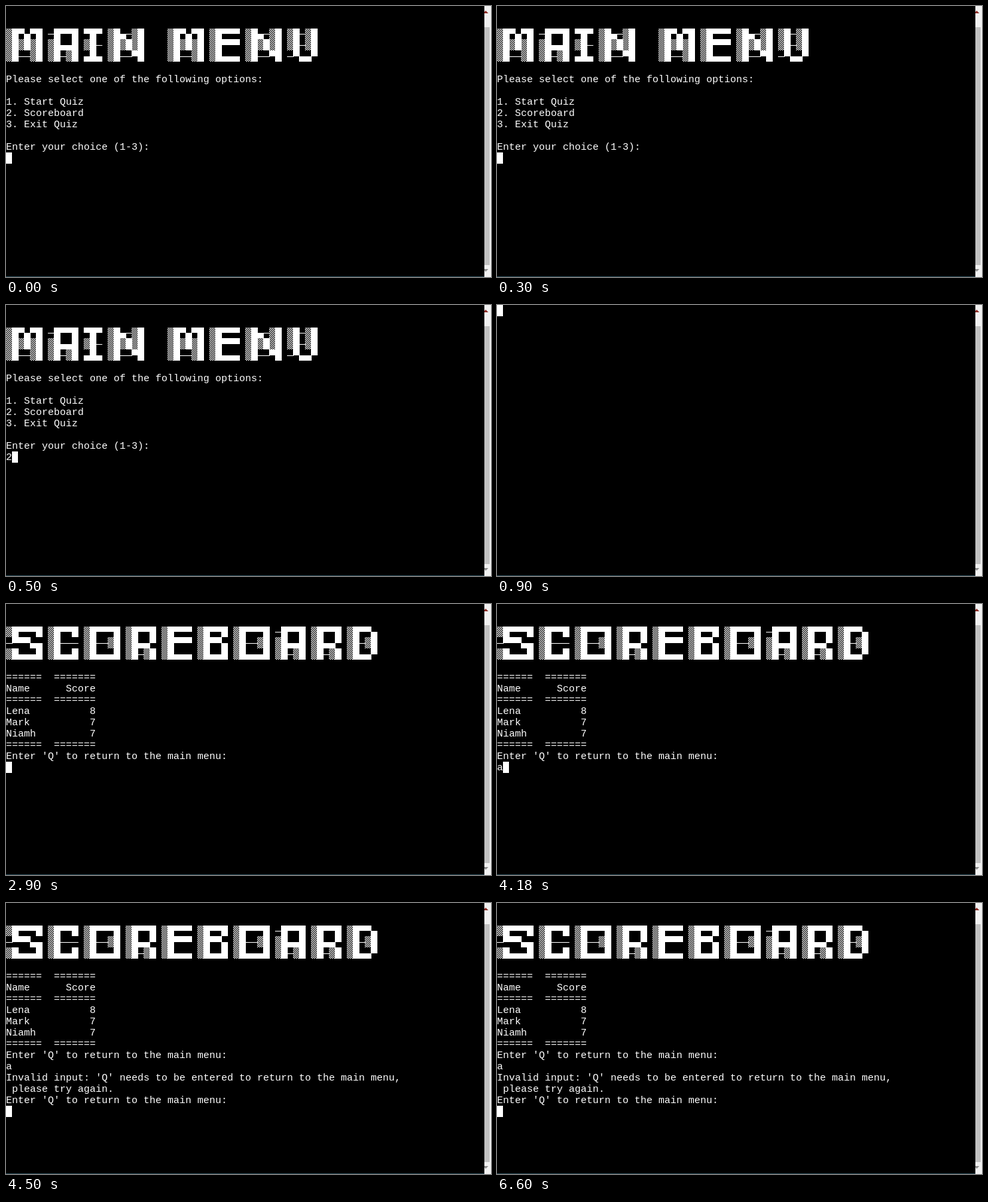
Animation, 730 px wide and 409 px high, one loop 8 s. Source, as an HTML page:

```html
<!DOCTYPE html>
<html lang="en">
<head>
<meta charset="utf-8">
<title>Quiz terminal</title>
<style>
  html, body { margin: 0; width: 100%; height: 100%; overflow: hidden; background: #000; }
  #stage { position: relative; width: 730px; height: 409px; overflow: hidden; background: #000; }
  #stage > *, .screen > * { position: absolute; left: 0; top: 0; }
  pre {
    margin: 0; color: #fff; white-space: pre;
    font: 15px/17px "Courier New", "Liberation Mono", monospace;
    font-variant-ligatures: none;
  }
  .screen > .banner { top: 34px; width: 720px; height: 50px; }
  .screen > .body { top: 103px; }
  .screen > .reply { top: 222px; }
  .board > .reply { top: 239px; }
  .board > .error { top: 256px; }

  .menu, .reply, .error, .board, #cursor { animation: 8s step-end infinite; }
  .menu { animation-name: menu; }
  .menu .reply { animation-name: choice; }
  .board { animation-name: board; }
  .board .reply { animation-name: letter; }
  .board .error { animation-name: error; }
  #cursor { width: 9px; height: 17px; background: #fff; animation-name: cursor; }

  @keyframes menu { 0% { opacity: 1 } 11.25%, 100% { opacity: 0 } }
  @keyframes choice { 0% { opacity: 0 } 6.25%, 100% { opacity: 1 } }
  @keyframes board { 0% { opacity: 0 } 12.125%, 100% { opacity: 1 } }
  @keyframes letter { 0% { opacity: 0 } 52.25%, 100% { opacity: 1 } }
  @keyframes error { 0% { opacity: 0 } 56.25%, 100% { opacity: 1 } }
  @keyframes cursor {
    0% { transform: translate(0, 221px) }
    6.25% { transform: translate(9px, 221px) }
    11.25% { transform: translate(0, 0) }
    12.125% { transform: translate(0, 238px) }
    52.25% { transform: translate(9px, 238px) }
    56.25%, 100% { transform: translate(0, 306px) }
  }
</style>
</head>
<body>
<div id="stage">
  <div class="screen menu">
    <svg class="banner" viewBox="0 1 720 50" data-text="MAIN MENU"></svg>
    <pre class="body">Please select one of the following options:

1. Start Quiz
2. Scoreboard
3. Exit Quiz

Enter your choice (1-3):</pre>
    <pre class="reply">2</pre>
  </div>
  <div class="screen board">
    <svg class="banner" viewBox="0 1 720 50" data-text="SCOREBOARD"></svg>
    <pre class="body">======  =======
Name      Score
======  =======
Lena          8
Mark          7
Niamh         7
======  =======
Enter 'Q' to return to the main menu:</pre>
    <pre class="reply">a</pre>
    <pre class="error">Invalid input: 'Q' needs to be entered to return to the main menu,
 please try again.
Enter 'Q' to return to the main menu:</pre>
  </div>
  <div id="cursor"></div>
  <svg width="730" height="409">
    <defs>
      <pattern id="shade" width="3" height="3" patternUnits="userSpaceOnUse">
        <path d="M0 0h1.5v1.5h-1.5zM1.5 1.5h1.5v1.5h-1.5z" fill="#fff"/>
      </pattern>
    </defs>
    <path d="M0 408h720v1H0z" fill="#2b4a56"/>
    <path d="M720 0h10v409h-10z" fill="#f1f1f1"/>
    <path d="M720 32h8v359h-8z" fill="#c1c1c1"/>
    <path d="M720 11v-2l2-2 4 4z" fill="#8b2a25"/>
    <path d="M720 397h6l-4 4-2-2z" fill="#8c8c8c"/>
  </svg>
</div>
<script>
const CELL = 9, ROW = 17, HALF = 9;

const glyphs = {
  A: ["─█▀▀█", "▒█▄▄█", "▒█─▒█"],
  B: ["▒█▀▀█", "▒█▀▀▄", "▒█▄▄█"],
  C: ["▒█▀▀█", "▒█───", "▒█▄▄█"],
  D: ["▒█▀▀▄", "▒█─▒█", "▒█▄▄▀"],
  E: ["▒█▀▀▀", "▒█▀▀▀", "▒█▄▄▄"],
  I: ["▀█▀", "▒█─", "▄█▄"],
  M: ["▒█▀▄▀█", "▒█▒█▒█", "▒█──▒█"],
  N: ["▒█▄─▒█", "▒█▒█▒█", "▒█──▀█"],
  O: ["▒█▀▀▀█", "▒█──▒█", "▒█▄▄▄█"],
  R: ["▒█▀▀█", "▒█▄▄▀", "▒█─▒█"],
  S: ["▒█▀▀▀█", "─▀▀▀▄▄", "▒█▄▄▄█"],
  U: ["▒█─▒█", "▒█─▒█", "─▀▄▄▀"],
  " ": ["  ", "  ", "  "]
};

// Top and height of each block character within its row
const blocks = {
  "█": [0, ROW], "▒": [0, ROW],
  "▀": [0, HALF], "▄": [HALF, ROW - HALF],
  "─": [HALF, 1]
};

function drawBanner(svg) {
  let solid = "", shade = "";
  for (let row = 0; row < 3; row++) {
    const line = [...svg.dataset.text].map(ch => glyphs[ch][row]).join(" ");
    [...line].forEach((ch, col) => {
      if (!blocks[ch]) return;
      const [top, h] = blocks[ch];
      // Solid glyphs spill one pixel into the next cell
      const w = ch === "▒" ? CELL : CELL + 1;
      const d = `M${col * CELL} ${row * ROW + top}h${w}v${h}h${-w}z`;
      if (ch === "▒") shade += d; else solid += d;
    });
  }
  svg.innerHTML = `<path d="${shade}" fill="url(#shade)"/>` +
    `<path d="${solid}" fill="#fff" shape-rendering="crispEdges"/>`;
}

document.querySelectorAll(".banner").forEach(drawBanner);
</script>
</body>
</html>
```
